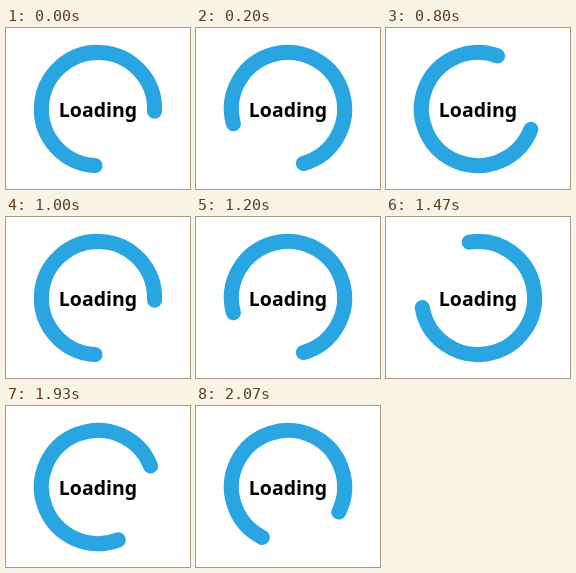
Animation, 184 px wide and 161 px high, one loop 2.14 s. Source, as an HTML page:

```html
<!DOCTYPE html>
<html lang="en">
<head>
<meta charset="utf-8">
<title>Loading</title>
<style>
  html, body { margin: 0; width: 100%; height: 100%; overflow: hidden; background: #fff; }
  svg { display: block; width: 184px; height: 161px; }
  path { fill: none; stroke: #29a6e1; stroke-width: 15.1; stroke-linecap: round; }
  text { font: 700 19.5px "Noto Sans", "Open Sans", sans-serif; text-anchor: middle; }
</style>
</head>
<body>
<svg viewBox="0 0 184 161">
  <path id="ring"/>
  <text x="92" y="89">Loading</text>
</svg>
<script>
  const LOOP = 2140;
  const STEPS = 32;
  const STEP_ANGLE = 24;
  const START_ANGLE = 93;
  const SWEEP = 269.2;
  const CENTER = { x: 92, y: 81 };
  const RADIUS = 56.6;

  const ring = document.getElementById("ring");

  function point(degrees) {
    const a = degrees * Math.PI / 180;
    const x = CENTER.x + RADIUS * Math.cos(a);
    const y = CENTER.y + RADIUS * Math.sin(a);
    return `${x.toFixed(3)} ${y.toFixed(3)}`;
  }

  // Steps begin at multiples of 1/15 s, rounded to 10 ms.
  const stepStart = step => Math.round(step * 20 / 3) * 10;

  function stepAt(time) {
    let step = STEPS - 1;
    while (stepStart(step) > time) step--;
    return step;
  }

  function render(time) {
    const start = START_ANGLE + STEP_ANGLE * stepAt(time % LOOP);
    ring.setAttribute("d",
      `M${point(start)}A${RADIUS} ${RADIUS} 0 1 1 ${point(start + SWEEP)}`);
  }

  let origin = null;
  function tick(now) {
    origin ??= now;
    render(now - origin);
    requestAnimationFrame(tick);
  }

  render(0);
  requestAnimationFrame(tick);
</script>
</body>
</html>
```
